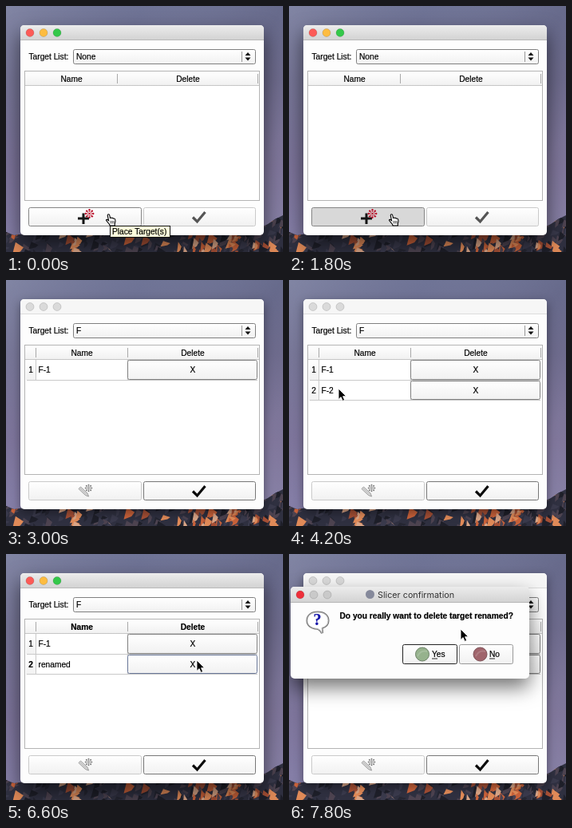
Write an HTML page that moves like this. It is 347 px wide and 308 px high and loops after 8000 ms.

```html
<!DOCTYPE html>
<html lang="en">
<head>
<meta charset="utf-8">
<title>Target list</title>
<style>
  html, body { margin: 0; width: 100%; height: 100%; overflow: hidden; background: #757089; }
  svg { display: block; width: 347px; height: 308px; }
  text { font: 10.2px "Liberation Sans", Arial, sans-serif; fill: #000; stroke: #000; stroke-width: .2px; white-space: pre; }
  .bold { font-weight: bold; }
  .mid { text-anchor: middle; }
  .title { font: 10.8px Inter, sans-serif; fill: #333; stroke: none; }
  .quest { font: bold 20px "Liberation Serif", serif; fill: #1414a8; stroke: #1414a8; }
  .shadow { filter: drop-shadow(0 11px 12px rgba(0, 0, 0, .55)); }
  .soft { filter: drop-shadow(0 4px 6px rgba(0, 0, 0, .4)); }
</style>
</head>
<body>
<svg viewBox="0 0 347 308">
  <defs>
    <linearGradient id="sky" x2="0" y2="1">
      <stop stop-color="#6f7496"/>
      <stop offset=".3" stop-color="#6c6a8d"/>
      <stop offset=".65" stop-color="#7a7098"/>
      <stop offset=".9" stop-color="#847da6"/>
    </linearGradient>
    <linearGradient id="glow" x2="1" y2=".5">
      <stop stop-color="#a3a5bd" stop-opacity=".35"/>
      <stop offset=".4" stop-color="#8b8ca8" stop-opacity="0"/>
      <stop offset=".8" stop-color="#51506e" stop-opacity=".25"/>
      <stop offset="1" stop-color="#8d86a2" stop-opacity=".3"/>
    </linearGradient>
    <linearGradient id="bar" x2="0" y2="1">
      <stop stop-color="#ececec"/><stop offset="1" stop-color="#d3d3d3"/>
    </linearGradient>
    <linearGradient id="face" x2="0" y2="1">
      <stop stop-color="#fff"/><stop offset="1" stop-color="#f1f1f1"/>
    </linearGradient>
    <clipPath id="ridge">
      <path d="M0 283L10 287L24 285H304L318 278L328 273L337 267L347 262V308H0Z"/>
    </clipPath>
  </defs>
  <rect width="347" height="308" fill="url(#sky)"/>
  <rect width="347" height="308" fill="url(#glow)"/>
  <g clip-path="url(#ridge)">
    <rect width="347" height="308" fill="#2f3040"/>
    <g id="rocks"></g>
  </g>
  <g id="scene"></g>
</svg>
<script>
const LOOP = 8000, TICK = 300;

// Each entry changes part of the state at its time in ms.
const steps = [
  [0, { list: 'None', rows: [], active: true, bold: false, tip: true, down: '', edit: '', dialog: false, cursor: ['hand', 125, 260] }],
  [1500, { tip: false }],
  [1800, { down: 'place' }],
  [2100, { cursor: null }],
  [2400, { list: 'F', rows: ['F-1'], active: false, down: '' }],
  [3600, { rows: ['F-1', 'F-2'] }],
  [3900, { cursor: ['arrow', 104, 171] }],
  [4200, { cursor: ['arrow', 62, 136] }],
  [4500, { active: true, bold: true }],
  [4800, { edit: 'select', cursor: ['beam', 69, 139] }],
  [5100, { edit: 'type', rows: ['F-1', 'ren'] }],
  [5400, { rows: ['F-1', 'renamed'] }],
  [6000, { edit: '', cursor: ['arrow', 68, 137] }],
  [6300, { cursor: ['arrow', 158, 136] }],
  [6600, { cursor: ['arrow', 239, 133] }],
  [7500, { down: 'delete', bold: false }],
  [7800, { down: '', active: false, dialog: true, cursor: ['arrow', 215, 94] }]
];

const rect = (x, y, w, h, fill, stroke = 'none', extra = '') =>
  `<rect x="${x}" y="${y}" width="${w}" height="${h}" fill="${fill}" stroke="${stroke}" ${extra}/>`;
const path = (d, fill, stroke = 'none', width = 1) =>
  `<path d="${d}" fill="${fill}" stroke="${stroke}" stroke-width="${width}"/>`;
const text = (x, y, s, cls = '') => `<text x="${x}" y="${y}" class="${cls}">${s}</text>`;
const dot = (x, y, r, fill, stroke = 'none') =>
  `<circle cx="${x}" cy="${y}" r="${r}" fill="${fill}" stroke="${stroke}"/>`;
const button = (x, y, w, h, stroke = '#808080', down = false) =>
  rect(x, y, w, h, down ? '#d8d8d8' : 'url(#face)', stroke, 'rx="2"');

// Slanted shards, sunlit around a few places along the range.
function rocks() {
  let seed = 7;
  const rnd = () => (seed = seed * 16807 % 2147483647) / 2147483647;
  const sunny = [[20, 14, .3], [84, 20, .55], [155, 14, .4], [255, 38, .75], [322, 16, .6]];
  const lit = ['#c9623a', '#e08a58', '#a54f35', '#d9a587'], dark = ['#252632', '#3a3a4c', '#4d4350', '#1e1f29'];
  let out = '';
  for (let i = 0; i < 260; i++) {
    const x = rnd() * 357 - 5, y = 262 + rnd() * 46, w = 3 + rnd() * 7, h = 4 + rnd() * 9;
    const light = Math.max(...sunny.map(([at, spread, power]) => power * Math.exp(-(((x - at) / spread) ** 2))));
    const tones = rnd() < light ? lit : dark;
    out += path(`M${x} ${y}l${w} ${h * .5}l${-w * .4} ${h * .4}l${-w} ${h * .3}Z`, tones[Math.floor(rnd() * 4)]);
  }
  return out;
}

function lights(x, y, colors) {
  return colors.map((c, i) => dot(x + i * 17, y, 5, c, 'rgba(0,0,0,.13)')).join('');
}

function burst(x, y, size, color) {
  let out = dot(x, y, size * .25, color);
  for (let i = 0; i < 8; i++) {
    const a = i * Math.PI / 4, c = Math.cos(a) * size, s = Math.sin(a) * size;
    out += dot(x + c * .55, y + s * .55, size * .15, color) + dot(x + c * .95, y + s * .95, size * .24, color);
  }
  return out;
}

const cursors = {
  arrow: path('M0 0V13.5L3.1 10.6L5.2 15.4L7.6 14.3L5.6 9.7H9.7Z', '#000', '#fff', .9),
  beam: path('M-3 -6.5Q0 -6.5 0 -4.5Q0 -6.5 3 -6.5M0 -5V6M-3 7Q0 7 0 5Q0 7 3 7M-1.5 1H1.5', 'none', '#222', 1.2),
  hand: path('M2.2 2.2Q2.2 .8 3.4 .8Q4.6 .8 4.8 2.2L5.5 5.4Q6.4 4.5 7.4 5.5Q8.6 4.8 9.4 6.1Q11.4 5.7 11.8 7.5Q12.5 10.5 11.3 12.5V15H5.2Q4.7 13 2.7 11.2L.6 8.6Q.2 7.3 1.6 7.3L3.6 8.8Z', '#fff', '#000', 1.1) +
    path('M6.3 9V12.5M8.2 9V12.5M10 9V12.5', 'none', '#000', .7)
};

function tableView(s) {
  const n = s.rows.length, split = n ? 152.5 : 139.5;
  const head = s.bold ? 'mid bold' : 'mid';
  let out = rect(23.5, 81.5, 294, 162, '#fff', '#b4b4b4') +
    rect(24, 82, 293, 17, 'url(#face)') +
    path('M24 99.5H317', 'none', '#c6c6c6') +
    path(`M${split} 85V97M315.5 85V97` + (n ? 'M37.5 85V97' : ''), 'none', '#a9a9a9') +
    text(n ? 95 : 82, 95, 'Name', head) + text(n ? 234 : 228, 95, 'Delete', head);
  s.rows.forEach((name, i) => {
    const y = 100 + i * 26, last = i === 1;
    out += rect(25, y, 12, 25, 'url(#face)') +
      path(`M26 ${125.5 + i * 25}H315M37.5 ${y}v25M152.5 ${y}v25`, 'none', '#c9c9c9') +
      text(31, y + 16, i + 1, last && s.bold ? 'mid bold' : 'mid');
    const editing = last && s.edit;
    if (editing === 'select') out += rect(39, y + 5, 16, 13, '#b3d5fd');
    out += text(editing ? 39.5 : 40.5, y + (editing ? 16 : 15.5), name);
    if (editing === 'type') {
      const x = name === 'renamed' ? 80.5 : 55.5;
      out += path(`M${x} ${y + 7}v12`, 'none', '#111');
    }
    out += button(152.5, y + .5, 162, 24 - i,
      last && s.bold ? '#697798' : '#808080', last && s.down === 'delete') +
      text(234, y + 15.5, 'X', 'mid');
  });
  return out;
}

function placeIcon(ready) {
  if (ready) return path('M90 266H104M97 259.5V273', 'none', '#151515', 3) + burst(104.5, 260, 5, '#b80e27');
  return path('M91 261.5L93.5 259L102 267L103.5 271L99.5 269.5Z', '#dedede', '#999', 1) +
    path('M92.5 260.5L101 268.5', 'none', '#aaa', .8) + burst(103.5, 260.5, 4, '#777');
}

function mainWindow(s) {
  const full = s.rows.length > 0;
  const colors = s.active ? ['#fc5b57', '#fdbc40', '#34c84a'] : ['#dadada', '#dadada', '#dadada'];
  return rect(18, 24, 305, 263, '#fdfdfd', 'none', `rx="5" class="${s.active ? 'shadow' : 'soft'}"`) +
    path('M18 42V29Q18 24 23 24H318Q323 24 323 29V42Z', s.active ? 'url(#bar)' : '#f6f6f6') +
    path('M18 42.5H323', 'none', s.active ? '#b9b9b9' : '#dcdcdc') +
    lights(30, 33.5, colors) +
    text(28.5, 67, 'Target List:') +
    button(84.5, 54.5, 228, 18) +
    path('M295.5 57V70', 'none', '#999') +
    path('M299.5 62L303 58L306.5 62ZM299.5 64.5L303 68.5L306.5 64.5Z', '#111') +
    text(88, 67, s.list) +
    tableView(s) +
    button(28.5, 252.5, 141, 23, full ? '#cacaca' : '#858585', s.down === 'place') + placeIcon(!full) +
    button(172.5, 252.5, 140, 23, full ? '#777' : '#cacaca') +
    path('M234 264.5L239.5 270L249.5 258', 'none', full ? '#0c0c0c' : '#555', 3.2);
}

function dialog() {
  const balloon = 'M36 73C28 73 23 77 23 83.5C23 89 28 93 35 93.3Q39 94 41.5 99Q41.5 95 41 92.5Q49 90 49 83.5C49 77 44 73 36 73Z';
  return rect(2, 41, 299, 115, '#fdfdfd', 'none', 'rx="5" class="shadow"') +
    path('M2 60V46Q2 41 7 41H296Q301 41 301 46V60Z', 'url(#bar)') +
    path('M2 60.5H301', 'none', '#b5b5b5') +
    lights(14, 51, ['#ee2f3a', '#c9c9c9', '#c9c9c9']) +
    dot(101.5, 50.5, 5.5, '#85899b') +
    text(111, 54.5, 'Slicer confirmation', 'title') +
    path(balloon, '#777', '#777', 3) + path(balloon, '#fff', '#bbb') +
    text(35.5, 89, '?', 'quest mid') +
    text(63.5, 81, 'Do you really want to delete target renamed?', 'bold') +
    button(142.5, 113.5, 68, 24, '#222') + button(213.5, 113.5, 67, 24, '#999') +
    dot(167, 125.5, 8.5, '#96b28d', '#6d8268') + dot(239.5, 125.5, 8.5, '#a0656c', '#7c4f55') +
    path('M161 128Q165 120 173 122M234 128Q238 120 246 122', 'none', 'rgba(255,255,255,.15)', 2) +
    text(179, 129, 'Yes') + text(251, 129, 'No') +
    path('M179 131H186M251 131H258', 'none', '#111', .9);
}

function draw(s) {
  let out = mainWindow(s);
  if (s.dialog) out += dialog();
  if (s.tip) out += rect(130.5, 275.5, 75, 14, '#ffffdc', '#111') + text(133, 286, 'Place Target(s)');
  if (s.cursor) {
    const [kind, x, y] = s.cursor;
    out += `<g transform="translate(${x} ${y})">${cursors[kind]}</g>`;
  }
  return out;
}

const scene = document.getElementById('scene');
document.getElementById('rocks').innerHTML = rocks();
const start = performance.now();
let shown = -1;

function play() {
  const tick = Math.floor(((performance.now() - start) % LOOP) / TICK);
  if (tick !== shown) {
    shown = tick;
    const past = steps.filter(([at]) => at <= tick * TICK).map(([, change]) => change);
    scene.innerHTML = draw(Object.assign({}, ...past));
  }
  requestAnimationFrame(play);
}
play();
</script>
</body>
</html>
```
